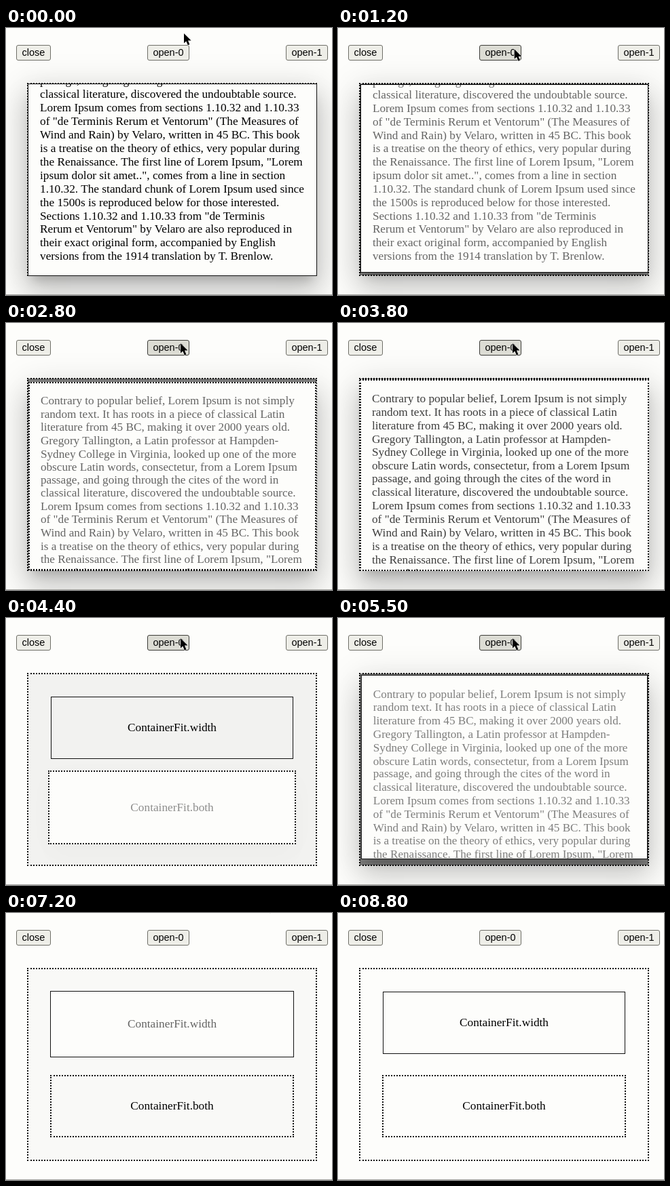
Animation of 480x394 px, one loop 8900 ms. Source, as an HTML page:

```html
<!DOCTYPE html>
<html lang="en">
<head>
<meta charset="utf-8">
<title>Container transform</title>
<style>
html, body { margin: 0; width: 100%; height: 100%; overflow: hidden; background: #fdfdfb; }
#stage { position: relative; width: 480px; height: 394px; overflow: hidden; color: #000;
  font: 17.3px/19.9px "Liberation Serif", "Times New Roman", serif; }
#stage > * { position: absolute; box-sizing: border-box; }
.button { top: 25px; height: 23px; z-index: 5; border: 1px solid #6f6f68; border-radius: 3px;
  background: #eeeee8; text-align: center; font: 14.5px/21px "Liberation Sans", Arial, sans-serif; }
.button.hover { background: #dcdcd4; border-color: #3c3c38; }
#area { left: 31px; top: 81px; width: 427px; height: 285px; border: 2px dotted #111; }
#scrim { left: 32px; top: 82px; width: 425px; height: 283px; z-index: 2; background: #000; }
.box { overflow: hidden; }
.box::after { content: ""; position: absolute; inset: 0; border: 1px solid #111; }
.box.dotted::after { border: 2px dotted #111; }
.label { position: absolute; inset: 0; display: flex; align-items: center; justify-content: center; }
.text { position: absolute; left: 0; top: 0; padding: 19px 18px; white-space: pre; transform-origin: 0 0; }
#rule { left: 0; top: 393px; width: 480px; height: 1px; background: #a4a4a0; z-index: 5; }
#cursor { left: 0; top: 0; z-index: 9; overflow: visible; }
</style>
</head>
<body>
<div id="stage">
  <div class="button" style="left:15px;width:51px">close</div>
  <div class="button" id="open0" style="left:208px;width:62px">open-0</div>
  <div class="button" style="left:412px;width:62px">open-1</div>
  <div id="area"></div>
  <div id="scrim"></div>
  <div class="box"><div class="label">ContainerFit.width</div><div class="text"></div></div>
  <div class="box dotted"><div class="label">ContainerFit.both</div><div class="text"></div></div>
  <div id="rule"></div>
  <svg id="cursor" width="12" height="19">
    <path d="M0 0V14.5L3.3 11.5L5.8 17.3L8.4 16.2L6 10.6H10.6Z" stroke="#fff" stroke-width="1" paint-order="stroke"/>
  </svg>
</div>
<script>
const LOOP = 8900, STEP = 100, DURATION = 1000;
const OPEN = [32, 82, 426, 284];

const passage = `Contrary to popular belief, Lorem Ipsum is not simply
random text. It has roots in a piece of classical Latin
literature from 45 BC, making it over 2000 years old.
Gregory Tallington, a Latin professor at Hampden-
Sydney College in Virginia, looked up one of the more
obscure Latin words, consectetur, from a Lorem Ipsum
passage, and going through the cites of the word in
classical literature, discovered the undoubtable source.
Lorem Ipsum comes from sections 1.10.32 and 1.10.33
of "de Terminis Rerum et Ventorum" (The Measures of
Wind and Rain) by Velaro, written in 45 BC. This book
is a treatise on the theory of ethics, very popular during
the Renaissance. The first line of Lorem Ipsum, "Lorem
ipsum dolor sit amet..", comes from a line in section
1.10.32. The standard chunk of Lorem Ipsum used since
the 1500s is reproduced below for those interested.
Sections 1.10.32 and 1.10.33 from "de Terminis
Rerum et Ventorum" by Velaro are also reproduced in
their exact original form, accompanied by English
versions from the 1914 translation by T. Brenlow.`;

// Each visit: start of opening, start of closing, scroll offset of the text.
const boxes = [
  { rect: [66, 116, 357, 92], fitBoth: false, visits: [[-2000, 1000, 152], [4750, 6400, 0]] },
  { rect: [65, 239, 359, 92], fitBoth: true, visits: [[2000, 3680, 0]] }
];
const cursorPath = [
  [0, 262, 8], [800, 260, 31], [2000, 259, 32], [2400, 257, 30],
  [6400, 257, 30], [7200, 383, -17], [7300, 400, -30]
];

const byId = id => document.getElementById(id);
const clamp = v => Math.min(1, Math.max(0, v));
const lerp = (a, b, k) => a + (b - a) * k;
const ease = t => t < .5 ? 4 * t ** 3 : 1 - 4 * (1 - t) ** 3;

document.querySelectorAll(".box").forEach((el, i) => {
  const [label, text] = el.children;
  text.textContent = passage;
  Object.assign(boxes[i], { el, label, text });
});

function drawBox(box, time) {
  const [start, end, scroll] = box.visits.findLast(visit => visit[0] <= time) ?? box.visits[0];
  const t = Math.min(clamp((time - start) / DURATION), 1 - clamp((time - end) / DURATION));
  const p = ease(t);
  const [x, y, w, h] = box.rect.map((v, i) => lerp(v, OPEN[i], p));
  const sx = w / OPEN[2], sy = box.fitBoth ? h / OPEN[3] : sx;
  Object.assign(box.el.style, {
    left: x + "px", top: y + "px", width: w + "px", height: h + "px",
    zIndex: t > 0 ? 3 : 1,
    background: t > 0 ? "#fdfdfb" : "none",
    boxShadow: `0 11px 15px -7px rgba(0,0,0,${.2 * p}),
      0 9px 46px 8px rgba(0,0,0,${.12 * p}),
      0 24px 38px 3px rgba(0,0,0,${.14 * p})`
  });
  box.label.style.opacity = clamp(1 - 2 * t);
  box.text.style.opacity = clamp(2 * t - 1);
  box.text.style.transform = `scale(${sx},${sy}) translateY(${-scroll}px)`;
  return p;
}

function pointAt(time) {
  const i = cursorPath.findIndex(point => point[0] > time);
  if (i < 0) return cursorPath.at(-1).slice(1);
  const [a, b] = [cursorPath[i - 1], cursorPath[i]];
  const k = (time - a[0]) / (b[0] - a[0]);
  return [lerp(a[1], b[1], k), lerp(a[2], b[2], k)];
}

function draw(time) {
  byId("scrim").style.opacity = .5 * Math.max(...boxes.map(box => drawBox(box, time)));
  const [x, y] = pointAt(time);
  byId("cursor").style.transform = `translate(${x}px,${y}px)`;
  byId("open0").classList.toggle("hover", x > 208 && x < 270 && y > 25 && y < 48);
}

const began = performance.now();
function tick() {
  const time = (performance.now() - began) % LOOP;
  draw(Math.floor(time / STEP) * STEP);
  requestAnimationFrame(tick);
}
tick();
</script>
</body>
</html>
```
